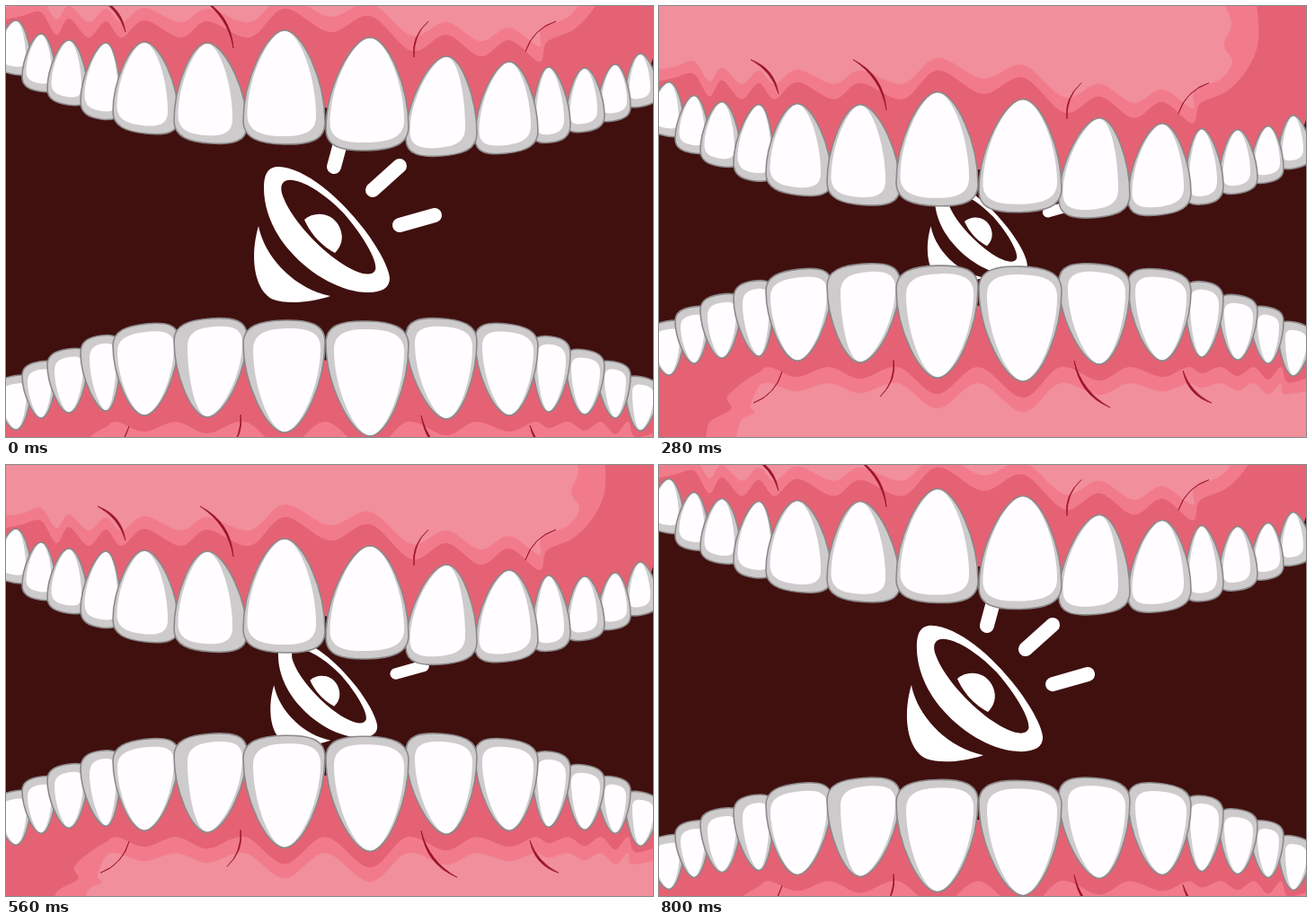
Animation of 720 by 480 pixels, one loop 0.84 s. Source, as an HTML page:

```html
<!DOCTYPE html>
<html lang="en">
<head>
<meta charset="utf-8">
<title>Talking teeth</title>
<style>
  html, body { margin: 0; width: 100%; height: 100%; overflow: hidden; background: #40100f; }
  svg { display: block; width: 720px; height: 480px; }
</style>
</head>
<body>
<svg viewBox="0 0 720 480" xmlns="http://www.w3.org/2000/svg">
  <rect width="720" height="480" fill="#40100f"/>
  <g id="horn" fill="#fff">
    <path fill-rule="evenodd" d="M303 179C333 180 371 213 398 248C414 269 426 291 427 303C427 314 418 319 403 319
      C374 319 340 300 317 274C297 252 287 226 287 203C287 188 291 179 303 179Z
      M314 194C306 195 304 203 309 214C318 237 346 268 371 285C390 298 407 303 411 294C414 284 397 255 376 231C352 206 326 192 314 194Z"/>
    <path d="M332 238C343 228 362 230 370 244C376 255 375 266 366 275C351 267 339 254 332 238Z"/>
    <path d="M281 245C287 277 318 314 361 323C338 331 311 332 298 327C278 319 270 283 281 245Z"/>
  </g>
  <path id="rays" d="M365 179L375 142M408 205L438 178M438 244L477 233" fill="none" stroke="#fff" stroke-width="16" stroke-linecap="round"/>
  <g id="upper"></g>
  <g id="lower"></g>
</svg>
<script>
const $ = id => document.getElementById(id);

function add(parent, d, fill, stroke = 'none', width = 0) {
  const p = document.createElementNS('http://www.w3.org/2000/svg', 'path');
  const attrs = { d, fill, stroke, 'stroke-width': width };
  for (const k in attrs) p.setAttribute(k, attrs[k]);
  parent.appendChild(p);
}

// Smooth curve through points
function curve(pts) {
  const at = i => pts[Math.max(0, Math.min(pts.length - 1, i))];
  let d = `M${at(0)}`;
  for (let i = 0; i < pts.length - 1; i++) {
    const [a, b, c, e] = [at(i - 1), at(i), at(i + 1), at(i + 2)];
    d += `C${b[0] + (c[0] - a[0]) / 6},${b[1] + (c[1] - a[1]) / 6} ` +
         `${c[0] - (e[0] - b[0]) / 6},${c[1] - (e[1] - b[1]) / 6} ${c}`;
  }
  return d;
}

// Pointed at the root, blunt at the crown; tilt slants the crown edge
function tooth(l, r, tip, root, crown, tilt) {
  const w = r - l, h = crown - root, m = (l + r) / 2, s = tilt * w / 2;
  const side = root + .8 * h, soft = .22 * w, flat = .3 * w, edge = crown - .04 * h;
  return `M${tip},${root}C${tip + soft},${root} ${r},${root + .44 * h} ${r},${side + s}` +
    `C${r},${edge + s} ${m + flat},${crown + tilt * flat} ${m},${crown}` +
    `C${m - flat},${crown - tilt * flat} ${l},${edge - s} ${l},${side - s}` +
    `C${l},${root + .44 * h} ${tip - soft},${root} ${tip},${root}Z`;
}

// A thin crease, widest in the middle, bowed away from the stage centre line
function crease(x1, y1, x2, y2) {
  const bow = x1 < 360 ? .25 : -.25;
  const cx = (x1 + x2) / 2 + bow * (y2 - y1), cy = (y1 + y2) / 2 - bow * (x2 - x1);
  return `M${x1},${y1}Q${cx + 1.6},${cy - 1.6} ${x2},${y2}Q${cx - 1.6},${cy + 1.6} ${x1},${y1}Z`;
}

// Both jaws share the columns
const left = [-12, 18, 46, 83, 119, 187, 264, 356, 445, 522, 585, 623, 658, 689];
const right = [28, 56, 91, 128, 192, 268, 355, 448, 524, 592, 628, 666, 695, 726];
const tips = [11, 39, 70, 111, 154, 224, 310, 405, 490, 560, 604, 644, 678, 706];

function jaw(id, o) {
  const g = $(id), { root, crown, shade } = o;
  const dir = Math.sign(crown[0] - root[0]);

  // Gum edge: a crest at each root, a notch between neighbours
  const wave = (crest, notch) => tips.flatMap((x, i) => [
    [x, root[i] - dir * crest],
    [(right[i] + (left[i + 1] ?? 740)) / 2 + o.shift, notch(Math.max(root[i], root[i + 1] ?? 0))]
  ]);
  const edge = tips.map((x, i) => [x, root[i] + .66 * (crown[i] - root[i])]);
  const first = o.first * 2, last = o.last * 2;
  const band = i => [...o.head[i], ...wave(o.crest[i], o.notch[i]).slice(first, last), ...o.tail[i]];

  const fillGum = (pts, color) =>
    add(g, `${curve(pts)}L${pts[pts.length - 1][0]},${o.far}L${pts[0][0]},${o.far}Z`, color);
  fillGum([[-8, edge[0][1]], ...edge, [725, o.end]], '#e56274');
  fillGum(band(0), '#f27b8b');
  fillGum(band(1), '#f18f9c');
  o.creases.forEach(c => add(g, crease(...c), '#9a1329', '#9a1329', .7));

  const far = i => Math.abs(tips[i] - 355);
  [...tips.keys()].sort((a, b) => far(b) - far(a)).forEach(i => {
    const tilt = dir * .19 * (355 - tips[i]) / 355;
    const [l, r] = dir > 0 ? [4.5, shade[i]] : [shade[i], 5];
    add(g, tooth(left[i], right[i], tips[i], root[i], crown[i], tilt), '#cdcbcc', '#8b8889', 1.6);
    add(g, tooth(left[i] + l, right[i] - r, tips[i], root[i] + dir, crown[i] - dir * 9, tilt), '#fffdff');
  });
}

jaw('upper', {
  root: [85, 100, 107, 110, 109, 110, 96, 104, 125, 131, 137, 138, 134, 122],
  crown: [145, 164, 179, 195, 211, 222, 223, 230, 236, 233, 221, 209, 197, 181],
  shade: [6, 5, 7, 3, 12, 16, 10, 5, 13, 8, 7, 8, 4, 9],
  far: -12, end: 112, shift: 5, first: 1, last: 10,
  crest: [24, 38],
  notch: [y => y - 6, y => y - 23],
  head: [[[-5, 85], [18, 80]], [[-5, 71], [18, 68]]],
  tail: [
    [[602, 109], [632, 95], [655, 70], [667, 38], [664, -12]],
    [[596, 95], [626, 81], [638, 62], [629, 44], [637, 18], [622, -12]]
  ],
  creases: [[102, 60, 133, 98], [216, 60, 253, 116], [470, 86, 454, 126], [612, 86, 578, 120]]
});

jaw('lower', {
  root: [411, 398, 392, 390, 395, 397, 414, 418, 399, 395, 391, 394, 398, 412],
  crown: [351, 335, 321, 306, 293, 287, 289, 290, 287, 293, 307, 322, 335, 352],
  shade: [6, 6, 8, 10, 5, 15, 11, 9, 10, 8, 6, 6, 8, 8],
  far: 492, end: 396, shift: 0, first: 3, last: 13,
  crest: [18, 34],
  notch: [() => 402, () => 420],
  head: [
    [[52, 492], [56, 464], [80, 449], [76, 435], [96, 417]],
    [[84, 492], [91, 462], [106, 453], [102, 445]]
  ],
  tail: [[[700, 419], [725, 413]], [[696, 432], [725, 428]]],
  creases: [[137, 407, 105, 442], [261, 394, 246, 435], [462, 395, 502, 447], [583, 406, 615, 442]]
});

// Travel of the upper jaw in px, one value per step
const STEP = 40;
const travel = [0, 2, 8.5, 21, 37, 52, 63, 68.7, 70, 70, 70, 70, 69.3, 65, 55, 38, 19, 8, 2, 0, -.5];

const scaleAt = (id, x, y, s) =>
  $(id).setAttribute('transform', `translate(${x} ${y}) scale(${s}) translate(${-x} ${-y})`);

function draw(ms) {
  const d = travel[Math.floor(ms / STEP) % travel.length];
  $('upper').setAttribute('transform', `translate(0 ${d - 69})`);
  $('lower').setAttribute('transform', `translate(0 ${61 - d * .886})`);
  const s = 1 - .27 * d / 70;
  scaleAt('horn', 362, 246, s);
  scaleAt('rays', 418, 190, s);
}

let start;
function tick(now) {
  start ??= now;
  draw(now - start);
  requestAnimationFrame(tick);
}
draw(0);
requestAnimationFrame(tick);
</script>
</body>
</html>
```
